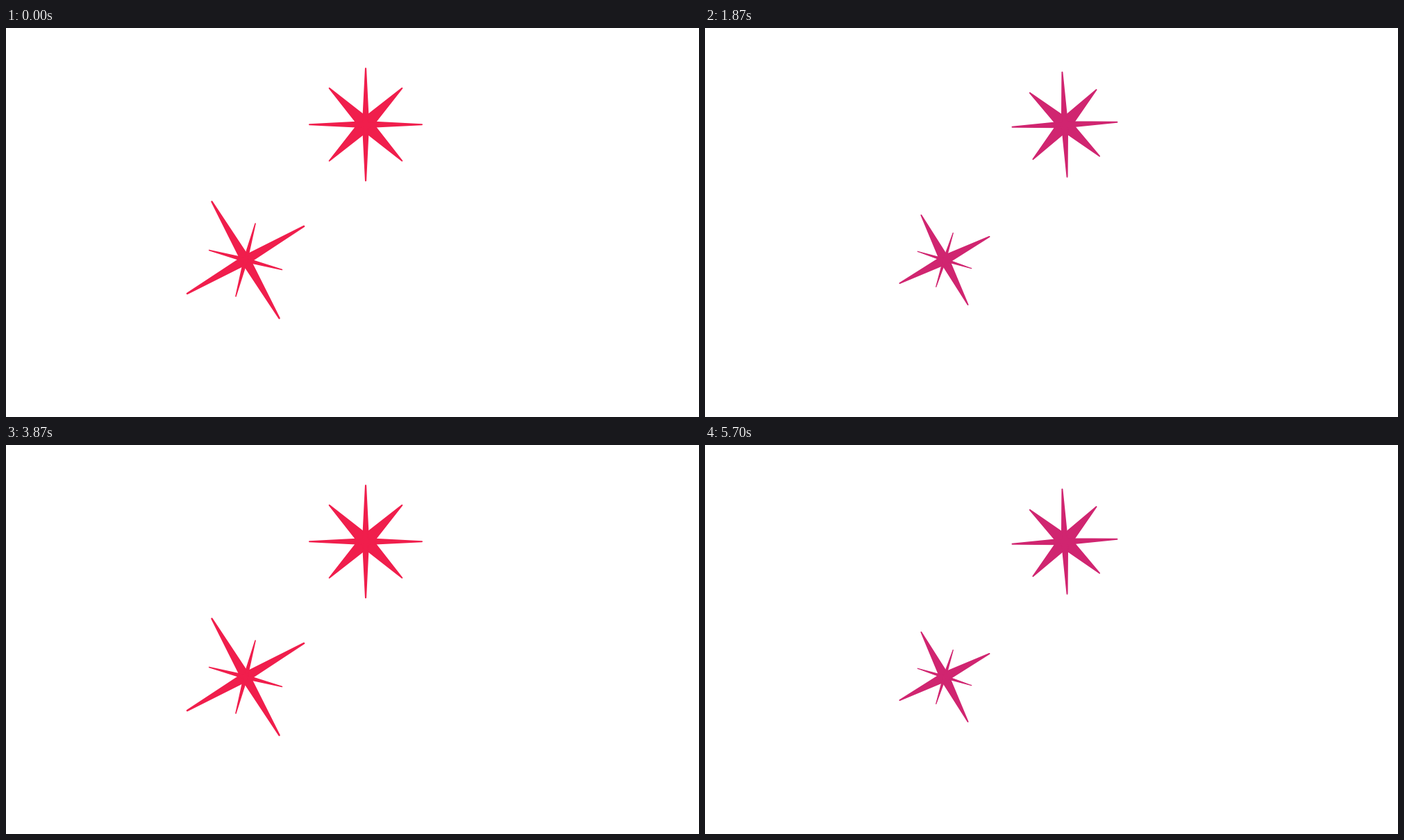
Animation of 998x561 px, one loop 5730 ms. Source, as an HTML page with a canvas:

```html
<!DOCTYPE html>
<html lang="en">
<head>
<meta charset="utf-8">
<title>Twinkling stars</title>
<style>
html, body { margin: 0; width: 100%; height: 100%; overflow: hidden; background: #fff; }
canvas { display: block; width: 998px; height: 561px; }
</style>
</head>
<body>
<canvas id="stage" width="998" height="561"></canvas>
<script>
const ctx = document.getElementById('stage').getContext('2d');
const LOOP = 5730, POSES = 24;

// Red, orange, lime, teal, indigo, purple: evenly spaced over the cycle.
const PALETTE = [[240, 30, 76], [250, 160, 40], [183, 201, -30], [63, 181, 160], [99, 90, 209], [112, 58, 220]];

function colorAt(pose) {
  const step = pose / POSES * PALETTE.length, i = Math.floor(step);
  const next = PALETTE[(i + 1) % PALETTE.length];
  return `rgb(${PALETTE[i].map((v, c) => Math.round(v + (next[c] - v) * (step - i)))})`;
}

// Linear rise, hold and fall; a pulse may run past the end of the cycle.
function pulse(pose, start, full, fade, end, height) {
  const p = pose < start ? pose + POSES : pose;
  return height * Math.max(0, Math.min(1, (p - start) / (full - start), (end - p) / (end - fade)));
}

// Four-pointed star with blunt tips; angle in degrees, clockwise.
function star(x, y, length, core, angle) {
  if (length < 1) return;
  const tip = 0.4 + length * 0.021;
  const notch = Math.max(0.3, core * Math.min(1, length / 60) - tip / 2);
  ctx.beginPath();
  for (let i = 0; i < 8; i++) {
    const r = i % 2 ? notch : length - tip / 2;
    const a = (angle + i * 45) * Math.PI / 180;
    ctx.lineTo(x + r * Math.sin(a), y - r * Math.cos(a));
  }
  ctx.closePath();
  ctx.lineWidth = tip;
  ctx.fill();
  ctx.stroke();
}

function topStar(pose) {
  const wide = Math.max(pulse(pose, 12, 16, 16, 21, 82), pulse(pose, 12, 24, 24, 32, 75));
  const thin = pulse(pose, 9, 24, 24, 33, 82);
  const u = (pose + 12) % POSES / 12;
  const angle = 45 * (u < 1 ? u + u * u * (1 - u) / 3 : u);
  star(518, 139.2, wide, 12.3, angle);
  star(518, 139.2, thin, 6.5, angle + 45);
}

function leftStar(pose) {
  const length = pulse(pose, 20, 24.8, 31, 37, 118);
  const angle = pose < 12 ? -30 - 2.7 * pose : -2.5 * (pose - 12);
  star(345, 334.5, length, 9, angle);
  star(345, 334.5, length * 0.56, 4.5, angle + 45);
}

function compass(pose) {
  const x = 602.8, y = 418.8, angle = 3.8 * (11.5 - pose);
  const long = pulse(pose, 0, 11.6, 12, 18, 96);
  star(x, y, Math.max(long, pulse(pose, 0, 6, 6, 12, 126)), 7.5, angle);
  star(x, y, pulse(pose, 0, 6, 6, 18, 100), 6.5, angle + 45);
  const ring = pulse(pose, 6, 12, 12, 21, 33);
  if (ring > 0 && long > 0) {
    ctx.beginPath();
    ctx.arc(x, y, ring, 0, Math.PI * 2);
    ctx.lineWidth = 0.6 + ring * 0.035;
    ctx.stroke();
  }
}

function draw(time) {
  // Poses run at 12.5 per second, shown on a 30 per second clock.
  const tick = Math.floor((time % LOOP + 4) * 0.03);
  const pose = Math.floor(tick / 2.4 + 1e-6) % POSES;
  ctx.clearRect(0, 0, 998, 561);
  ctx.fillStyle = ctx.strokeStyle = colorAt(pose);
  ctx.lineJoin = 'round';
  topStar(pose);
  leftStar(pose);
  compass(pose);
}

const begin = performance.now();
function loop() {
  draw(performance.now() - begin);
  requestAnimationFrame(loop);
}
loop();
</script>
</body>
</html>
```
